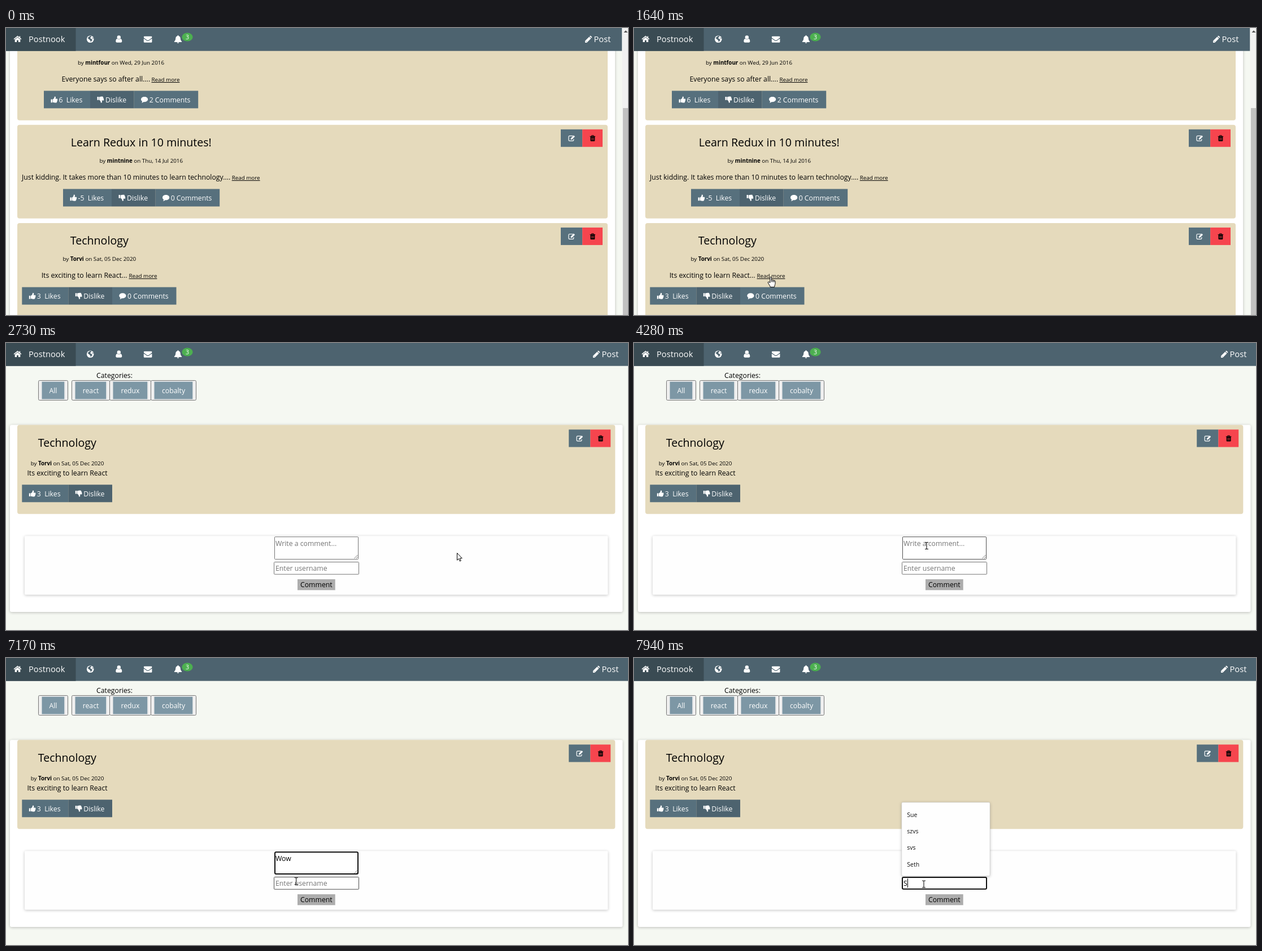
Write an HTML page that moves like this. It is 1101x509 px and loops after 8 s.

```html
<!DOCTYPE html>
<html lang="en">
<head>
<meta charset="utf-8">
<title>Blog comments</title>
<style>
  html, body { margin: 0; width: 100%; height: 100%; overflow: hidden; background: #f5f8f2; }
  svg { display: block; width: 1101px; height: 509px; font: 12.25px "Open Sans", sans-serif; }
  text { white-space: pre; }
  .mid { text-anchor: middle; }
  .shade { filter: drop-shadow(0 1.6px 2.5px rgba(0, 0, 0, .24)); }
</style>
</head>
<body>
<svg id="stage" viewBox="0 0 1101 509"></svg>
<script>
const LOOP = 8000, PAGE_SWAP = 1720, BLINK = 530;
const C = { nav: '#4d636f', dark: '#3a4b53', btn: '#57707d', pale: '#7d97a5', sand: '#e5dabc', red: '#f6454e', hint: '#757575' };
const stage = document.getElementById('stage');

// --- drawing helpers ---
const rect = (x, y, x2, y2, fill, more = '') =>
  `<rect x="${x}" y="${y}" width="${x2 - x}" height="${y2 - y}" fill="${fill}" ${more}/>`;
const text = (x, y, s, { size = 12.25, fill = '#000', mid = false, more = '' } = {}) =>
  `<text x="${x}" y="${y}" font-size="${size}" fill="${fill}" ${mid ? 'class="mid"' : ''} ${more}>${s}</text>`;

const THUMB = 'M0 5.3H2.5V11H0ZM3.2 5.4C4.6 4.9 5.6 3.6 6 2.4 6.2 1.2 6.2.3 7 .3 8.7.3 8.9 2 8 4.4H10.6C11.8 4.4 12.1 5.6 11.4 6.3 11.8 6.9 11.6 7.7 11 8.1 11.3 8.8 11 9.4 10.4 9.7 10.6 10.7 10 11.4 8.8 11.4 6.5 11.4 5 11.1 3.2 10.6Z';
const ICONS = {
  home: '<path d="M2.2 7.6 7 3.6 11.8 7.6V12H8.4V8.8H5.6V12H2.2Z"/><path d="M.6 6.9 7 1.6 13.4 6.9M10.9 1.6V4.4" fill="none" stroke="currentColor" stroke-width="1.5"/>',
  globe: '<circle cx="6.5" cy="6.5" r="6.3"/><path d="M5.3 1.2 7.6.9 8.6 2.4 7 3.3 6.3 4.6 7.7 6 9.5 6.5 10 8.2 8 10.6 7.3 12 6.6 9.4 5.6 7.7 3.4 6.2 1.9 4.3Z" fill="#4d636f"/><path d="M10 3.2 11.6 4 11.9 5.8 10.4 5.3Z" fill="#4d636f"/>',
  user: '<circle cx="5.5" cy="3.3" r="3.2"/><path d="M2.6 5.8C4.4 7.5 6.6 7.5 8.4 5.8 10.3 6.1 11 8.2 11 10.4 11 11.8 10.2 12.5 9 12.5H2C.8 12.5 0 11.8 0 10.4 0 8.2.7 6.1 2.6 5.8Z"/>',
  mail: '<path d="M0 1.3Q0 0 1.3 0H13.3Q14.6 0 14.6 1.3C14.6 2.6 13.6 3.3 12 4.4L8.7 6.7Q7.3 7.6 5.9 6.7L2 4C.8 3.2 0 2.5 0 1.3ZM0 3.9 5.4 7.6Q7.3 8.8 9.2 7.6L14.6 3.9V9.7Q14.6 11 13.3 11H1.3Q0 11 0 9.7Z"/>',
  bell: '<path d="M7 0Q7.9 0 7.8 1.2C10.4 1.8 11.2 3.8 11.3 6 11.4 8.6 12.3 9.9 13.8 11.2Q13.8 12.2 12.8 12.2H1.2Q.2 12.2.2 11.2C1.7 9.9 2.6 8.6 2.7 6 2.8 3.8 3.6 1.8 6.2 1.2Q6.1 0 7 0ZM5.2 12.6H8.8Q8.5 14.3 7 14.3 5.5 14.3 5.2 12.6Z"/>',
  pencil: '<path d="M0 12.3V9.2L7.4 1.8 10.5 4.9 3.1 12.3ZM8.1 1.1 8.8.4Q9.5-.2 10.2.4L11.9 2.1Q12.5 2.8 11.9 3.5L11.2 4.2Z"/><path d="M1.4 9.6 2.7 10.9" stroke="#4d636f"/>',
  up: `<path d="${THUMB}"/>`,
  down: `<path transform="translate(0 11.8) scale(1 -1)" d="${THUMB}"/>`,
  bubble: '<path d="M6.1.8C9.6.8 12.2 2.8 12.2 5.4 12.2 8 9.6 10 6.1 10Q5.4 10 4.7 9.9C3.6 10.9 2.4 11.4.9 11.6 1.7 10.8 2 10 2.1 9 .8 8.1 0 6.8 0 5.4 0 2.8 2.6.8 6.1.8Z"/>',
  edit: '<path d="M8.4 1.4H2.3Q.7 1.4.7 3V8.6Q.7 10.2 2.3 10.2H7.9Q9.5 10.2 9.5 8.6V7" fill="none" stroke="currentColor" stroke-width="1.2"/><path d="M4.4 7.8V5.7L9.6.5 11.7 2.6 6.5 7.8Z"/>',
  trash: '<path d="M3 1.8V.6H6.6V1.8M0 2.3H9.6" fill="none" stroke="currentColor"/><path d="M.9 2.4H8.7V9.6Q8.7 10.8 7.6 10.8H2Q.9 10.8.9 9.6Z"/><path d="M3 4.2V9M4.8 4.2V9M6.6 4.2V9" stroke="#f6454e" stroke-width=".7"/>'
};
const icon = (name, x, y, color = '#fff') =>
  `<g transform="translate(${x} ${y})" fill="${color}" color="${color}">${ICONS[name]}</g>`;

// --- page parts ---
function navBar(right) {
  const white = { size: 14.7, fill: '#fff' };
  return rect(0, 0, right, 40.7, C.nav) + rect(0, 0, 123.5, 40.7, C.dark) +
    icon('home', 13.5, 13) + text(40, 25, 'Postnook', white) +
    icon('globe', 142.7, 13.2) + icon('user', 194.3, 13.2) + icon('mail', 243.8, 14.8) + icon('bell', 297.5, 12.8) +
    '<ellipse cx="321" cy="16" rx="9.6" ry="7.6" fill="#4caf50"/>' +
    text(321, 19.8, '3', { size: 10.5, fill: '#fff', mid: true }) +
    icon('pencil', right - 65.5, 13.6) + text(right - 50, 25, 'Post', white);
}

function editButtons(x, y) {
  return rect(x, y, x + 38.2, y + 31, C.btn) + rect(x + 38.2, y, x + 74, y + 31, C.red) +
    icon('edit', x + 13.3, y + 10.2) + icon('trash', x + 51.6, y + 10.2, '#000');
}

function voteButtons(x, y, likes, comments) {
  const white = { fill: '#fff' }, mid = x + (likes < 0 ? 86 : 82), end = mid + 77.7;
  return rect(x, y, mid, y + 31, C.btn) + rect(mid, y, end, y + 31, C.nav) +
    icon('up', x + 12.5, y + 9.8) + text(x + 26.5, y + 20.2, `${likes}\u00a0 Likes`, white) +
    icon('down', mid + 12.5, y + 9.8) + text(mid + 27, y + 20.2, 'Dislike', white) +
    (comments === undefined ? '' : rect(end, y, end + 113.5, y + 31, C.btn) +
      icon('bubble', end + 12.3, y + 9.8) + text(end + 27, y + 20.2, comments + ' Comments', white));
}

const byline = (x, y, name, date) =>
  text(x, y, `by <tspan font-weight="700">${name}</tspan> on ${date}`, { size: 9.8, mid: true });
const title = (x, y, s) => text(x, y, s, { size: 19.6, mid: true });

function post(p) {
  return rect(20, p.y, 1065, p.y + 166, C.sand, 'rx="4"') + title(p.cx, p.y + 38, p.title) +
    byline(p.cx, p.y + 67.3, p.by, p.date) + text(p.x, p.y + 97.3, p.body) +
    text(p.more, p.y + 97.3, 'Read more', { size: 9.8, more: 'text-decoration="underline"' }) +
    voteButtons(p.bx, p.y + 113.7, p.likes, p.comments) + editButtons(982, p.y + 8);
}

function feedPage() {
  const posts = [
    { y: -2.3, cx: 203.5, title: '', by: 'mintfour', date: 'Wed, 29 Jun 2016', x: 98.5, body: 'Everyone says so after all....', more: 257.5, bx: 67, likes: 6, comments: 2 },
    { y: 171.8, cx: 239.3, title: 'Learn Redux in 10 minutes!', by: 'mintnine', date: 'Thu, 14 Jul 2016', x: 28, body: 'Just kidding. It takes more than 10 minutes to learn technology....', more: 399.7, bx: 101, likes: -5, comments: 0 },
    { y: 345.9, cx: 165.3, title: 'Technology', by: 'Torvi', date: 'Sat, 05 Dec 2020', x: 62.7, body: 'Its exciting to learn React...', more: 217.5, bx: 28.3, likes: 3, comments: 0 }
  ];
  return rect(0, 0, 1101, 509, '#f5f8f2') + rect(7, -20, 1078, 530, '#fff', 'class="shade"') +
    posts.map(post).join('') + navBar(1090.5) +
    rect(1090.5, 0, 1101, 509, '#f1f1f1') + rect(1092, 142, 1101, 509, '#c1c1c1') +
    '<path d="M1093.5 8 1097 4.3 1100.5 8Z" fill="#505050"/>';
}

function category(x, x2, name) {
  return rect(x, 66.5, x2, 101.5, '#efefef', 'rx="2" stroke="#767676"') +
    rect(x + 6, 68.7, x2 - 6.2, 99.5, C.pale) + text((x + x2) / 2, 88.5, name, { fill: '#fff', mid: true });
}

function postPage() {
  return rect(0, 0, 1101, 509, '#f5f8f2') + navBar(1104.5) +
    text(192, 62, 'Categories:', { mid: true }) +
    category(57.5, 109.5, 'All') + category(116.5, 183.5, 'react') +
    category(183.5, 256.5, 'redux') + category(256.5, 336.5, 'cobalty') +
    rect(7, 145.3, 1091.5, 477, '#fff', 'rx="3" class="shade"') +
    rect(20, 145.3, 1078.3, 303.3, C.sand, 'rx="4"') +
    title(108.3, 183.7, 'Technology') + byline(108.5, 217.2, 'Torvi', 'Sat, 05 Dec 2020') +
    text(108.5, 234.7, 'Its exciting to learn React', { mid: true }) +
    voteButtons(28.3, 251.3, 3) + editButtons(996.2, 153.5) +
    rect(33, 342.3, 1065.5, 446.5, '#fefefe', 'rx="2" class="shade"') +
    rect(516, 419, 582.7, 438.3, '#adadad') + text(549.3, 433.2, 'Comment', { mid: true });
}

const fieldBox = id => `<rect id="${id}Box" fill="#fff"/>` +
  `<text id="${id}Hint" fill="${C.hint}"></text><text id="${id}Text"></text><path id="${id}Caret" stroke="#000" stroke-width="1"/>`;

stage.innerHTML = `<g id="feed">${feedPage()}</g><g id="detail">${postPage()}${fieldBox('note')}
  <path d="M616.5 382 622.5 376M620 382 622.5 379.5" stroke="#777"/>${fieldBox('user')}
  <g id="menu"></g></g>
  <circle id="halo" r="9.6" fill="#ffee00" opacity=".6"/>
  <g id="pointer"><path id="arrow" d="M.5.5V13.2L3.4 10.5 5.3 15 7.3 14.1 5.4 9.8H9.3Z" fill="#fff" stroke="#000" stroke-linejoin="round"/>
  <path id="hand" d="M-1.2 1.2Q0-.6 1.3 1.2V6Q2.6 5 3.6 6.4 5 5.6 5.8 7 7.4 6.2 8 8V12.2C8 14 6.8 15 6.6 18.4H-.8C-1 16 -3.2 14.2 -4.6 11 -5.4 9 -3.6 8.4 -2.4 9.8L-1.2 11ZM1.3 6V9.5M3.6 6.5V9.6M5.8 7V9.8" fill="#fff" stroke="#000" stroke-linejoin="round"/>
  <path id="beam" d="M-3-6H-1Q0-6 0-5 0-6 1-6H3M0-5V5M-3 6H-1Q0 6 0 5 0 6 1 6H3" fill="none" stroke="#111" stroke-width="1.1"/></g>`;

const el = {};
stage.querySelectorAll('[id]').forEach(n => el[n.id] = n);
const show = (n, on) => n.style.display = on ? '' : 'none';
const set = (n, attrs) => { for (const k in attrs) n.setAttribute(k, attrs[k]); };

// --- timeline ---
// Pointer moves: first step, last step, step count, destination.
const MOVES = [
  [250, 350, 2, 351, 454], [650, 800, 3, 256, 454], [1020, 1180, 3, 242, 441],
  [2260, 2500, 4, 784, 383], [2640, 2730, 2, 798, 372], [3730, 3730, 1, 1091, 205],
  [3810, 3890, 2, 561, 352.5], [4190, 4280, 2, 518, 359.5], [6700, 7240, 8, 513, 401]
];
const CLICKS = [[1490, 1640, 242, 441], [4600, 4750, 516, 358.5], [7390, 7550, 513, 401]];
const FIELDS = {
  note: { x: 475, y: 343.3, x2: 624, y2: 384, base: 359.7, hint: 'Write a comment...', focus: [4600, 7390], keys: [[5910, 'W'], [6080, 'Wo'], [6150, 'Wow']] },
  user: { x: 474, y: 388, x2: 625, y2: 410.7, base: 403.9, hint: 'Enter username', focus: [7390, LOOP], keys: [[7860, 'S']] }
};
const MENU_OPEN = 7390, MENU_FILTER = 7940;
const ALL_NAMES = ['Bert hagen', 'szvs', 'svs', 'Sue', 'mmm', 'bbb'];
const S_NAMES = ['Sue', 'szvs', 'svs', 'Seth'];

function pointerAt(t) {
  let x = 789, y = 474;
  for (const [t0, t1, n, tx, ty] of MOVES) {
    if (t < t0) break;
    const gap = n > 1 ? (t1 - t0) / (n - 1) : 1;
    const k = Math.min(n, 1 + Math.floor((t - t0) / gap + 1e-6)) / n;
    x += (tx - x) * k;
    y += (ty - y) * k;
  }
  return { x, y };
}

const inside = (p, b) => p.x > b.x && p.x < b.x2 && p.y > b.y && p.y < b.y2;
const LINK = { x: 218, y: 431, x2: 268, y2: 448 };

function drawField(id, t, p) {
  const f = FIELDS[id], focused = t >= f.focus[0] && t < f.focus[1];
  const inset = focused ? 1 : .5;
  set(el[id + 'Box'], {
    x: f.x + inset, y: f.y + inset, width: f.x2 - f.x - 2 * inset, height: f.y2 - f.y - 2 * inset,
    rx: focused ? 2 : 1, 'stroke-width': focused ? 2 : 1,
    stroke: focused ? '#101010' : inside(p, f) ? '#4f4f4f' : '#767676'
  });
  let value = '', since = f.focus[0];
  for (const [at, s] of f.keys) if (t >= at) { value = s; since = at; }
  const typed = el[id + 'Text'], hint = el[id + 'Hint'];
  for (const n of [typed, hint]) set(n, { x: 477, y: f.base });
  typed.textContent = value;
  hint.textContent = value ? '' : f.hint;
  const cx = Math.floor(477.3 + (value ? typed.getComputedTextLength() : 0)) + .5;
  set(el[id + 'Caret'], { d: `M${cx} ${f.base - 12.7}V${f.base + 3.3}` });
  show(el[id + 'Caret'], focused && Math.floor((t - since) / BLINK) % 2 === 0);
}

let menuNames;
function drawMenu(t) {
  show(el.menu, t >= MENU_OPEN);
  const names = t < MENU_FILTER ? ALL_NAMES : S_NAMES;
  if (names === menuNames) return;
  menuNames = names;
  const top = 386.3 - 29.3 * names.length - 13;
  el.menu.innerHTML = rect(473.8, top, 630, 386.5, '#fefefe', 'rx="2" stroke="#c9c9c9" stroke-width=".6" class="shade"') +
    names.map((s, i) => text(483.3, top + 25.5 + 29.3 * i, s, { size: 10.5, fill: '#111', more: 'font-weight="500"' })).join('');
}

function draw(t) {
  const detail = t >= PAGE_SWAP, p = pointerAt(t);
  show(el.feed, !detail);
  show(el.detail, detail);
  if (detail) {
    drawField('note', t, p);
    drawField('user', t, p);
    drawMenu(t);
  }
  const overField = detail && (inside(p, FIELDS.note) || inside(p, FIELDS.user));
  const overLink = !detail && inside(p, LINK);
  show(el.pointer, t >= MOVES[0][0]);
  show(el.beam, overField);
  show(el.hand, overLink);
  show(el.arrow, !overField && !overLink);
  set(el.pointer, { transform: `translate(${p.x} ${p.y})` });
  const click = CLICKS.find(c => t >= c[0] && t < c[1]);
  show(el.halo, click);
  if (click) set(el.halo, { cx: click[2], cy: click[3] });
}

const start = performance.now();
function tick() {
  draw((performance.now() - start) % LOOP);
  requestAnimationFrame(tick);
}
tick();
</script>
</body>
</html>
```
